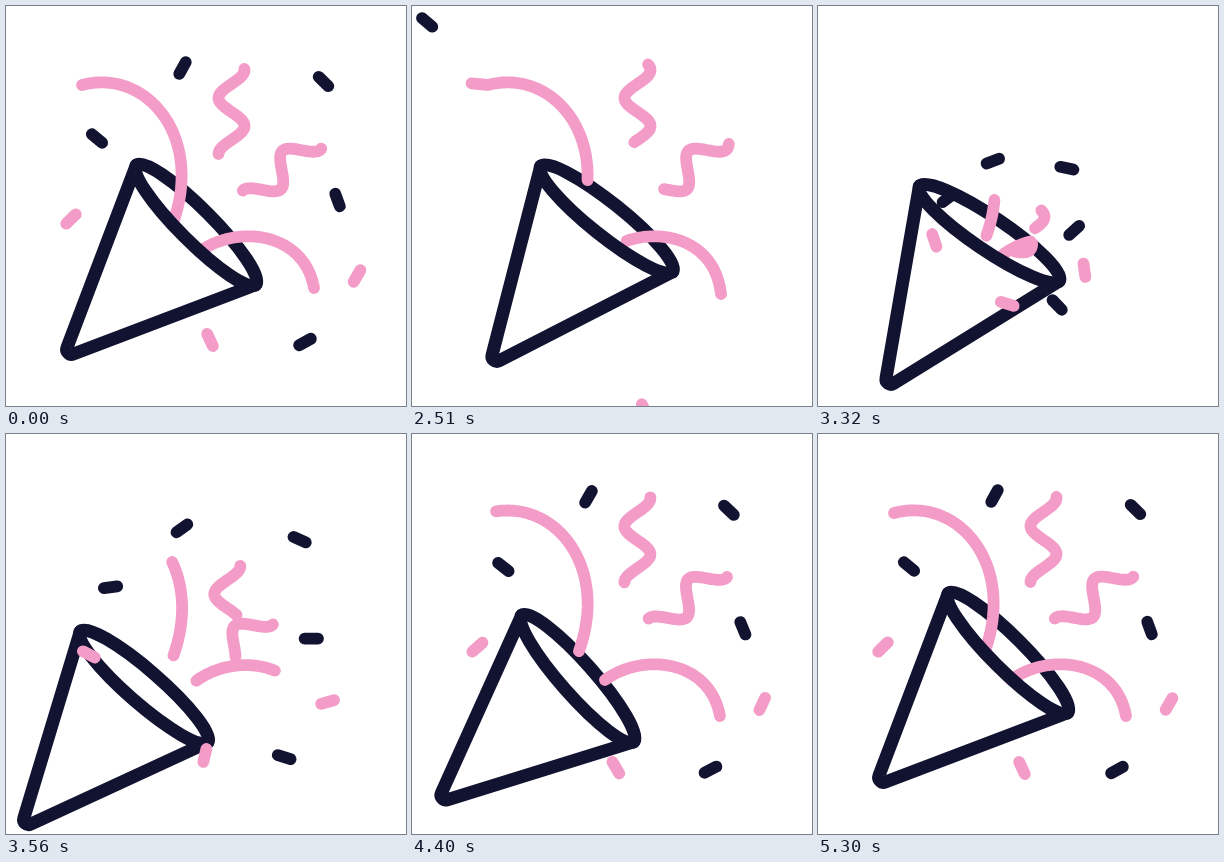
An HTML page with a canvas for the animation above (5.33 s loop, 400 px wide and 400 px high).

```html
<!DOCTYPE html>
<html lang="en">
<head>
<meta charset="utf-8">
<title>Party popper</title>
<style>
html, body { margin: 0; width: 100%; height: 100%; overflow: hidden; background: #fff; }
canvas { display: block; width: 400px; height: 400px; }
</style>
</head>
<body>
<canvas id="stage" width="400" height="400"></canvas>
<script>
const ctx = document.getElementById('stage').getContext('2d');
const DARK = '#121331', PINK = '#f49cc8';
const LOOP = 5330, LEAVE = 2030, GONE = 3120, BURST = 3210;
const ORIGIN = [173, 258];

const lerp = (a, b, k) => a + (b - a) * k;
const clamp = v => Math.max(0, Math.min(1, v));
const radians = degrees => degrees * Math.PI / 180;
const easeOut = (t, duration) => 1 - (1 - clamp((t - BURST) / duration)) ** 2;

// Remaining distance to the resting place after the burst
const spread = t => t > 4720 ? 0 : Math.exp(-0.0044 * (t - 3560));

// Cone poses: time, mouth centre, tilt
const REST = [190, 219, 45];
const poses = [
  [LEAVE, ...REST], [3100, 201, 205, 30], [3560, 138, 253, 41],
  [4040, 151, 253, 49.7], [5150, ...REST]
];

// Monotone cubic interpolation between poses
function conePose(t) {
  const last = poses.length - 1;
  const i = poses.findIndex(p => p[0] > t) - 1;
  if (i < 0) return REST;
  const slope = (j, c) => (poses[j + 1][c] - poses[j][c]) / (poses[j + 1][0] - poses[j][0]);
  const tangent = (j, c) => {
    if (j === 0 || j === last) return 0;
    const before = slope(j - 1, c), after = slope(j, c);
    return before * after <= 0 ? 0 : 2 * before * after / (before + after);
  };
  const span = poses[i + 1][0] - poses[i][0], u = (t - poses[i][0]) / span;
  return [1, 2, 3].map(c => lerp(poses[i][c], poses[i + 1][c], u * u * (3 - 2 * u))
    + span * u * (1 - u) * (tangent(i, c) * (1 - u) - tangent(i + 1, c) * u));
}

function inCone([x, y, tilt], draw) {
  ctx.save();
  ctx.translate(x, y);
  ctx.rotate(radians(tilt));
  ctx.strokeStyle = DARK;
  ctx.lineWidth = 13;
  ctx.beginPath();
  draw();
  ctx.stroke();
  ctx.restore();
}

function bezier(points, u) {
  while (points.length > 1) {
    points = points.slice(1).map((p, i) => [lerp(points[i][0], p[0], u), lerp(points[i][1], p[1], u)]);
  }
  return points[0];
}

// An arc from the mouth, followed by the curve it leaves along
function arc(duration, curve, exit) {
  return {
    duration, pull: 0.03, start: 0, length: 1, end: 2, middle: bezier(curve, 0.5),
    point: u => u < 1 ? bezier(curve, u) : bezier([curve[3], ...exit], u - 1)
  };
}

// A sine wave running from (x, y) in the given direction
function wave(x, y, direction) {
  const cos = Math.cos(radians(direction)), sin = Math.sin(radians(direction));
  const point = u => {
    const v = -13 * Math.cos(Math.PI * u / 28);
    return [x + u * cos - v * sin, y + u * sin + v * cos];
  };
  return { duration: 1000, pull: 0.08, start: -50, length: 85, end: 137, middle: point(42), point };
}

const streamers = [
  arc(1500, [[167, 217], [198, 130], [140, 62], [76, 79]], [[0, 72], [72, 75], [73, 24]]),
  arc(1000, [[193, 246], [231, 218], [298, 226], [308, 282]], [[312, 300], [318, 380], [322, 640]]),
  wave(225.5, 148, -90),
  wave(246, 193.7, -45)
];

function drawStreamer(s, t) {
  const leaving = t < GONE;
  const k = leaving ? ((t - LEAVE) / (GONE - LEAVE)) ** 3 : easeOut(t, s.duration);
  const from = leaving ? lerp(0, s.end, k) : lerp(s.start, 0, k);
  const to = leaving ? lerp(s.length, s.end, k) : lerp(s.start, s.length, k);
  if (to - from < s.length / 100) return;
  const shift = leaving ? 0 : s.pull * spread(t);
  ctx.strokeStyle = PINK;
  ctx.beginPath();
  for (let i = 0; i <= 60; i++) {
    const [x, y] = s.point(lerp(from, to, i / 60));
    ctx.lineTo(x + (ORIGIN[0] - s.middle[0]) * shift, y + (ORIGIN[1] - s.middle[1]) * shift);
  }
  ctx.stroke();
}

// Confetti at rest, with the turn still to make shortly after the burst
const bit = (color, x, y, angle, turn) => ({ color, x, y, angle, turn });
const confetti = [
  bit(DARK, 176.5, 62, -61, 25),
  bit(DARK, 317.5, 75.5, 44, -20),
  bit(DARK, 91, 132.5, 40, -48),
  bit(DARK, 331.5, 194, 70, -70),
  bit(DARK, 299, 336, -29, 47),
  bit(PINK, 65, 213, -44, 72),
  bit(PINK, 351, 270, -60, -136),
  bit(PINK, 204, 334, 65, -142)
];

function drawBit({ color, x, y, angle, turn }, t) {
  const leaving = t < GONE;
  if (!leaving && t < BURST) return;
  const toOrigin = leaving ? -4 * ((t - LEAVE) / 1000) ** 2 : 0.166 * spread(t);
  const left = leaving ? 0 : Math.max(0, (4710 - t) / 1150) ** 2.5;
  const cx = lerp(x, ORIGIN[0], toOrigin), cy = lerp(y, ORIGIN[1], toOrigin);
  const a = radians(angle + turn * left);
  const dx = 6.7 * Math.cos(a), dy = 6.7 * Math.sin(a);
  ctx.strokeStyle = color;
  ctx.beginPath();
  ctx.moveTo(cx - dx, cy - dy);
  ctx.lineTo(cx + dx, cy + dy);
  ctx.stroke();
}

function render(t) {
  ctx.fillStyle = '#fff';
  ctx.fillRect(0, 0, 400, 400);
  ctx.lineCap = ctx.lineJoin = 'round';
  ctx.lineWidth = 11.8;
  const cone = conePose(t);

  inCone(cone, () => ctx.ellipse(0, 0, 84.5, 16.5, 0, Math.PI, 2 * Math.PI));
  streamers.forEach(s => drawStreamer(s, t));
  inCone(cone, () => {
    ctx.ellipse(0, 0, 84.5, 16.5, 0, Math.PI, 0, true);
    ctx.arcTo(0, 188, -84.5, 0, 5);
    ctx.closePath();
  });
  confetti.forEach(b => drawBit(b, t));
}

const begin = performance.now();
function tick() {
  render(Math.max(LEAVE, (performance.now() - begin) % LOOP));
  requestAnimationFrame(tick);
}
tick();
</script>
</body>
</html>
```
